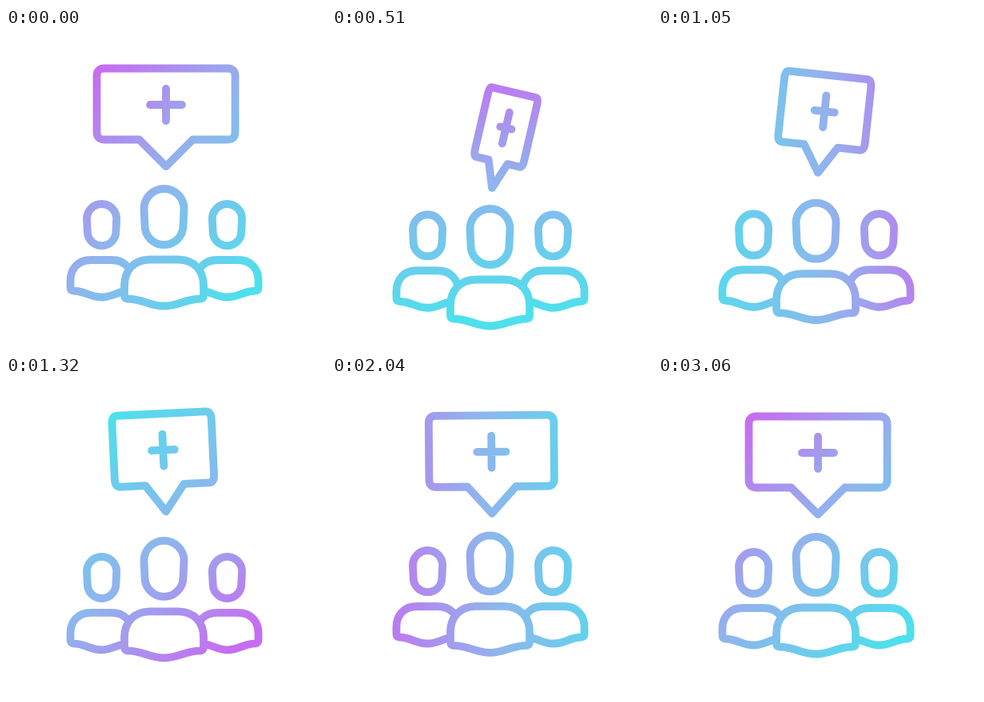
Write an HTML page with a canvas that moves like this. It is 400 px wide and 400 px high and loops after 5.09 s.

```html
<!DOCTYPE html>
<html lang="en">
<head>
<meta charset="utf-8">
<title>Group message</title>
<style>
  html, body { margin: 0; width: 100%; height: 100%; overflow: hidden; background: #fff; }
  canvas { display: block; width: 100vw; height: 100vh; }
</style>
</head>
<body>
<canvas id="stage"></canvas>
<script>
const LOOP = 5090, MOVE_END = 3060, STEP = 30, SIZE = 400;
const canvas = document.getElementById('stage');
const ctx = canvas.getContext('2d');
const ratio = window.devicePixelRatio || 1;
canvas.width = canvas.height = SIZE * ratio;
ctx.scale(ratio, ratio);

// The bubble is drawn relative to the tip of its tail, which is its pivot.
const TIP = { x: 200, y: 173 };
const bubble = new Path2D('M-77 -122.5H77Q86.5 -122.5 86.5 -113V-43Q86.5 -33.5 77 -33.5' +
  'H33.5L0 0L-33.5 -33.5H-77Q-86.5 -33.5 -86.5 -43V-113Q-86.5 -122.5 -77 -122.5Z');
const plus = new Path2D('M-20 -77H20M0 -97V-57');

const leaderHead = new Path2D('M172.5 226A25 25 0 0 1 222.5 226L221.5 247A24 24 0 0 1 173.5 247Z');
const leaderBody = new Path2D('M180 289.5H215C236 289.5 247 304 247 322V334Q247 338 243 338.5' +
  'C222 339 216 347.5 197.5 347.5C179 347.5 173 339 152 338.5Q148 338 148 334V322' +
  'C148 304 159 289.5 180 289.5Z');
const sideHead = new Path2D('M101 238.6A18.6 18.6 0 0 1 138.2 238.6L137.4 254.4A17.8 17.8 0 0 1 101.8 254.4Z');
const sideBody = new Path2D('M106 290H132C149 290 158 302 158 316V324Q158 328 154 328.5' +
  'C138 329 134 336.5 119.5 336.5C104 336.5 100 329 84.5 328.5Q80.5 328 80.5 324V316' +
  'C80.5 302 89 290 106 290Z');

const progress = (time, from, to) => Math.min(1, Math.max(0, (time - from) / (to - from)));
const ease = (time, from, to) => (1 - Math.cos(Math.PI * progress(time, from, to))) / 2;

// Everything is pushed down, springs back past its rest and settles.
const leaderDrop = t => 25 * ease(t, 0, 520) - 27.5 * ease(t, 750, 1620) + 2.5 * ease(t, 1750, 2500);
const sideDrop = t => 14 * ease(t, 0, 600) - 16.7 * ease(t, 850, 1800) + 2.7 * ease(t, 1800, 2500);
const bubbleDrop = t => 27 * ease(t, 0, 320) - 31 * ease(t, 600, 1380) + 4 * ease(t, 1450, 2400);

const bubbleTilt = t => 13 * ease(t, 0, 520) - 18 * ease(t, 720, 1500) +
  8.6 * ease(t, 1550, 2500) - 3.6 * ease(t, 2500, MOVE_END);

// Turns edge-on quickly, then opens again ever more slowly.
const bubbleWidth = t => Math.max(.05, 1 - ease(t, 0, 310), progress(t, 300, 2500) ** .43);

const gradientAngle = t => 40 + 360 * (.3 * progress(t, 0, 2550) + .7 * ease(t, 0, 2550));

function turningGradient(degrees) {
  const angle = degrees * Math.PI / 180;
  const dx = 160 * Math.cos(angle), dy = 160 * Math.sin(angle);
  const gradient = ctx.createLinearGradient(200 - dx, 200 - dy, 200 + dx, 200 + dy);
  gradient.addColorStop(0, '#c66df0');
  gradient.addColorStop(.47, '#90b4ed');
  gradient.addColorStop(1, '#4ee0ec');
  return gradient;
}

// Moves the outline only, so stroke width and gradient stay in stage space.
function outline(path, matrix, filled = false) {
  const placed = new Path2D();
  placed.addPath(path, matrix);
  if (filled) ctx.fill(placed);
  ctx.stroke(placed);
}

function draw(time) {
  ctx.fillStyle = '#fff';
  ctx.fillRect(0, 0, SIZE, SIZE);
  ctx.strokeStyle = turningGradient(gradientAngle(time));
  ctx.lineWidth = 9.8;
  ctx.lineCap = ctx.lineJoin = 'round';

  const left = new DOMMatrix().translate(0, sideDrop(time));
  const right = left.translate(396, 0).scale(-1, 1);
  for (const side of [left, right]) {
    outline(sideHead, side);
    outline(sideBody, side);
  }

  const leader = new DOMMatrix().translate(0, leaderDrop(time));
  outline(leaderHead, leader);
  outline(leaderBody, leader, true);

  const sign = new DOMMatrix()
    .translate(TIP.x, TIP.y + bubbleDrop(time))
    .rotate(bubbleTilt(time))
    .scale(bubbleWidth(time), 1);
  outline(bubble, sign);
  outline(plus, sign);
}

const start = performance.now();
function tick() {
  const time = (performance.now() - start) % LOOP;
  draw(Math.min(Math.floor(time / STEP) * STEP, MOVE_END));
  requestAnimationFrame(tick);
}
tick();
</script>
</body>
</html>
```
